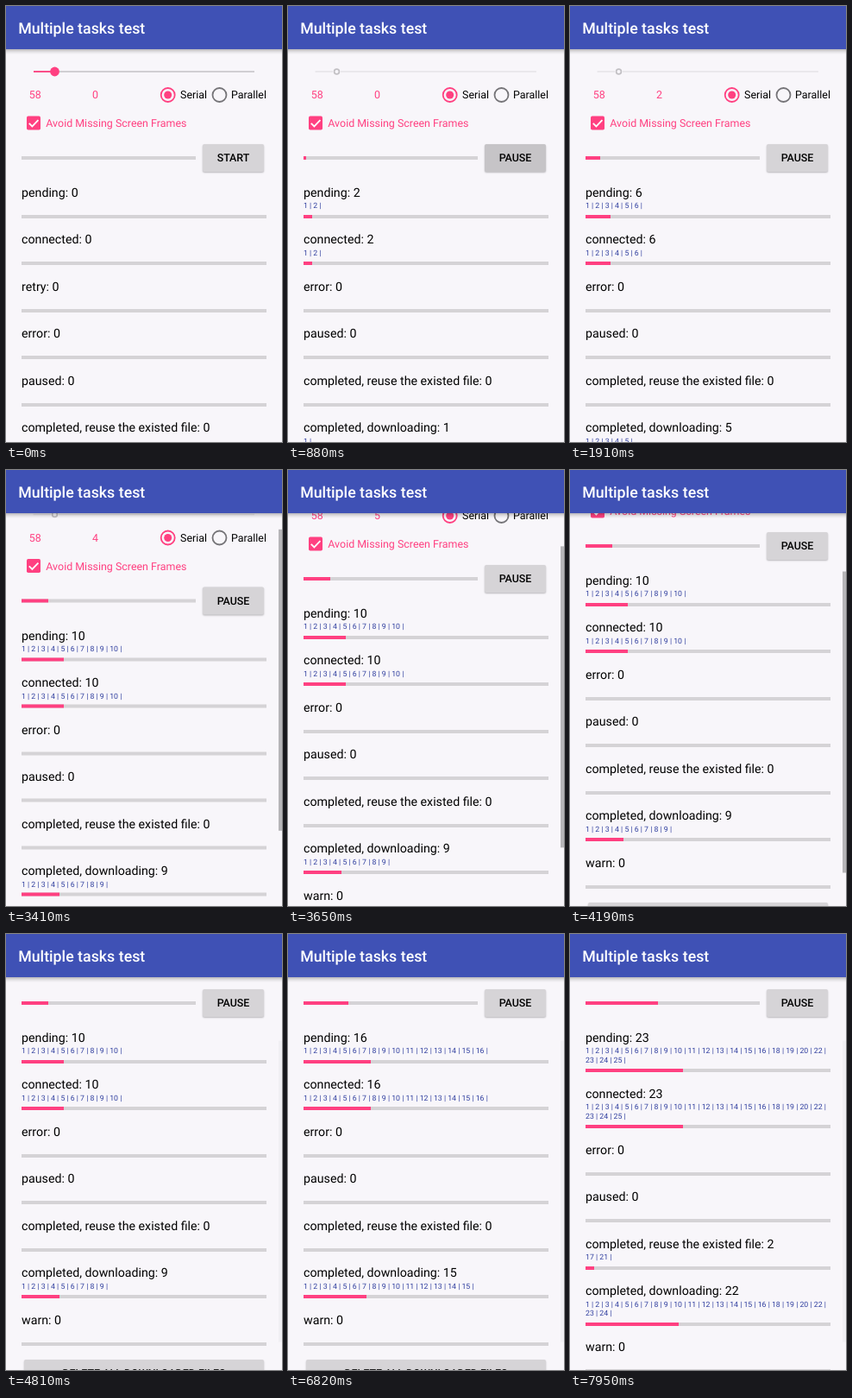
Write an HTML page that moves like this. It is 320 px wide and 505 px high and loops after 8 s.

```html
<!DOCTYPE html>
<html lang="en">
<head>
<meta charset="utf-8">
<title>Multiple tasks test</title>
<style>
  :root { --pink: #ff4081; --indigo: #3f51b5; --track: #d5d3d6; --page: #f8f6fa; }
  html, body { margin: 0; width: 100%; height: 100%; overflow: hidden; background: var(--page); }
  body { font: 12.44px/14.6px Roboto, sans-serif; color: #000; text-rendering: geometricPrecision; }
  #stage { position: relative; width: 320px; height: 505px; overflow: hidden; background: var(--page); }
  #stage header {
    position: absolute; inset: 0 0 auto; height: 50px; background: var(--indigo); color: #fff;
    font-size: 17.78px; font-weight: 500; line-height: 54px; text-indent: 14.2px;
  }
  header::after {
    content: ""; position: absolute; inset: 50px 0 auto; height: 6px;
    background: linear-gradient(rgba(0,0,0,.26), rgba(0,0,0,.09) 50%, transparent);
  }
  #page { position: absolute; inset: 0 0 auto; height: 650px; }
  #page > svg { position: absolute; left: 0; top: 0; }
  .label { position: absolute; top: 97px; white-space: nowrap; }
  .pink { color: var(--pink); }
  .bar { height: 4px; background: var(--track); }
  .bar i { display: block; height: 100%; width: 0; background: var(--pink); }
  #total { position: absolute; left: 18px; top: 174px; width: 202px; }
  .button {
    position: absolute; height: 32px; overflow: hidden; border-radius: 2px; background: #d6d4d7;
    text-align: center; font-weight: 500; line-height: 34px; box-shadow: 0 1px 2px rgba(0,0,0,.26);
  }
  .button span { position: relative; }
  #toggle { left: 228px; top: 160px; width: 71px; }
  #ripple {
    position: absolute; left: 35.5px; top: 16px; width: 80px; height: 80px; margin: -40px;
    border-radius: 50%; background: #000; opacity: 0;
  }
  #rows { position: absolute; left: 18px; top: 208.7px; width: 284px; }
  .row { margin-bottom: 17.2px; }
  .row b { display: block; font-weight: 400; font-size: 14.22px; line-height: 16.7px; white-space: nowrap; }
  .row p {
    margin: 1.8px 0 4.3px; min-height: 10.5px;
    font-size: 8.72px; line-height: 10.5px; color: #303f9f;
  }
  #delete { left: 3px; width: 278px; margin-top: -1.2px; }
  #thumb { position: absolute; right: 0; top: 50px; width: 4px; height: 349px; background: #8e8e90; opacity: 0; }
</style>
</head>
<body>
<div id="stage">
  <div id="page">
    <svg width="320" height="160" fill="none">
      <g id="seekOn">
        <path d="M32 76H288" stroke="#d0ced2" stroke-width="1.8"/>
        <path d="M32 76H56" stroke="#ff4081" stroke-width="1.8"/>
        <circle cx="56.5" cy="76" r="5.4" fill="#ff4081"/>
      </g>
      <g id="seekOff">
        <path d="M31.5 76H52M61 76H288" stroke="#e6e4e8" stroke-width="1.6"/>
        <circle cx="56.5" cy="76" r="2.9" stroke="#c2c0c4" stroke-width="1.7"/>
      </g>
      <circle cx="187.7" cy="103" r="8" stroke="#ff4081" stroke-width="1.8"/>
      <circle cx="187.7" cy="103" r="4.5" fill="#ff4081"/>
      <circle cx="247.5" cy="103" r="8" stroke="#757478" stroke-width="1.8"/>
      <rect x="24" y="127.6" width="16" height="16" rx="1.8" fill="#ff4081"/>
      <path d="M26.8 135.8l3.6 3.6 7-7.2" stroke="#fff" stroke-width="1.8"/>
    </svg>
    <span class="label pink" style="left:26.7px">58</span>
    <span class="label pink" style="left:100px" id="clock">0</span>
    <span class="label" style="left:202px">Serial</span>
    <span class="label" style="left:261px">Parallel</span>
    <span class="label pink" style="left:46.3px;top:130px">Avoid Missing Screen Frames</span>
    <div class="bar" id="total"><i></i></div>
    <div class="button" id="toggle"><div id="ripple"></div><span>START</span></div>
    <div id="rows"></div>
  </div>
  <div id="thumb"></div>
  <header>Multiple tasks test</header>
</div>
<script>
const LOOP = 8000, FILES = 58, PRESS = 400, START = 700, TICK = 650;
// Finish time of each file, in order.
const finishes = [
  820, 1000, 1190, 1590, 1910, 2240, 2630, 2890, 3350,
  5870, 5990, 6110, 6310, 6490, 6820,
  6940, 6940, 7060, 7190, 7310, 7310, 7640, 7790, 7950
];
const reused = [17, 21];
const scrollPath = [[3290, 0], [3350, 11], [3410, 24.5], [3650, 50], [3890, 68.5], [4130, 86], [4430, 96]];
const thumbFade = [[4630, .62], [4690, .42], [4750, .22], [4810, .06]];

const $ = id => document.getElementById(id);
const clamp = x => Math.max(0, Math.min(1, x));

function along(points, t) {
  if (t <= points[0][0]) return points[0][1];
  for (let i = 1; i < points.length; i++) {
    const [t0, a] = points[i - 1], [t1, b] = points[i];
    if (t < t1) return a + (b - a) * (t - t0) / (t1 - t0);
  }
  return points[points.length - 1][1];
}

function setText(node, text) {
  if (node.textContent !== text) node.textContent = text;
}

function setBar(bar, count) {
  bar.firstElementChild.style.width = count / FILES * 100 + "%";
}

function addRow(name) {
  const box = document.createElement("div");
  box.className = "row";
  box.innerHTML = '<b></b><p></p><div class="bar"><i></i></div>';
  $("rows").append(box);
  const [title, list, bar] = box.children;
  return {
    box,
    show(ids) {
      setText(title, `${name}: ${ids.length}`);
      setText(list, ids.map(id => id + " | ").join(""));
      setBar(bar, ids.length);
    }
  };
}

const [pending, connected, retry, error, paused, reuse, done, warn] = [
  "pending", "connected", "retry", "error", "paused",
  "completed, reuse the existed file", "completed, downloading", "warn"
].map(addRow);
[retry, error, paused, warn].forEach(row => row.show([]));
$("rows").insertAdjacentHTML("beforeend",
  '<div class="button" id="delete">DELETE ALL DOWNLOADED FILES</div>');

function drawTasks(t, running) {
  const finished = finishes.filter(at => at <= t).length;
  const ids = Array.from({ length: finished + running }, (_, i) => i + 1);
  const fresh = ids.filter(id => !reused.includes(id));
  pending.show(fresh);
  connected.show(fresh);
  reuse.show(reused.filter(id => id <= finished));
  done.show(fresh.filter(id => id <= finished));
  setBar($("total"), finished);
}

function drawControls(t, running) {
  retry.box.style.display = running ? "none" : "";
  $("seekOn").style.display = running ? "none" : "";
  $("seekOff").style.display = running ? "" : "none";
  setText($("toggle").lastElementChild, running ? "PAUSE" : "START");
  setText($("clock"), String(Math.max(0, Math.floor((t - 1650) / TICK) + 2)));
  const pressed = t >= PRESS && t < 1190;
  $("ripple").style.opacity = pressed ? .13 * (1 - clamp((t - START) / 430)) : 0;
  $("ripple").style.transform = `scale(${clamp((t - PRESS + 60) / 300)})`;
}

function drawScroll(t) {
  const step = 3350 + Math.floor((t - 3350) / 60) * 60;
  const y = along(scrollPath, step);
  $("page").style.transform = `translateY(${-y}px)`;
  $("thumb").style.transform = `translateY(${y * 455 / 593}px)`;
  $("thumb").style.opacity = t < 3350 ? 0 : along(thumbFade, t < 4630 ? 4630 : Math.min(step + 20, 4810));
}

function draw(now) {
  const t = now % LOOP;
  const running = t >= START ? 1 : 0;
  drawTasks(t, running);
  drawControls(t, running);
  drawScroll(t);
}

const origin = performance.now();
function frame() {
  draw(performance.now() - origin);
  requestAnimationFrame(frame);
}
frame();
</script>
</body>
</html>
```
